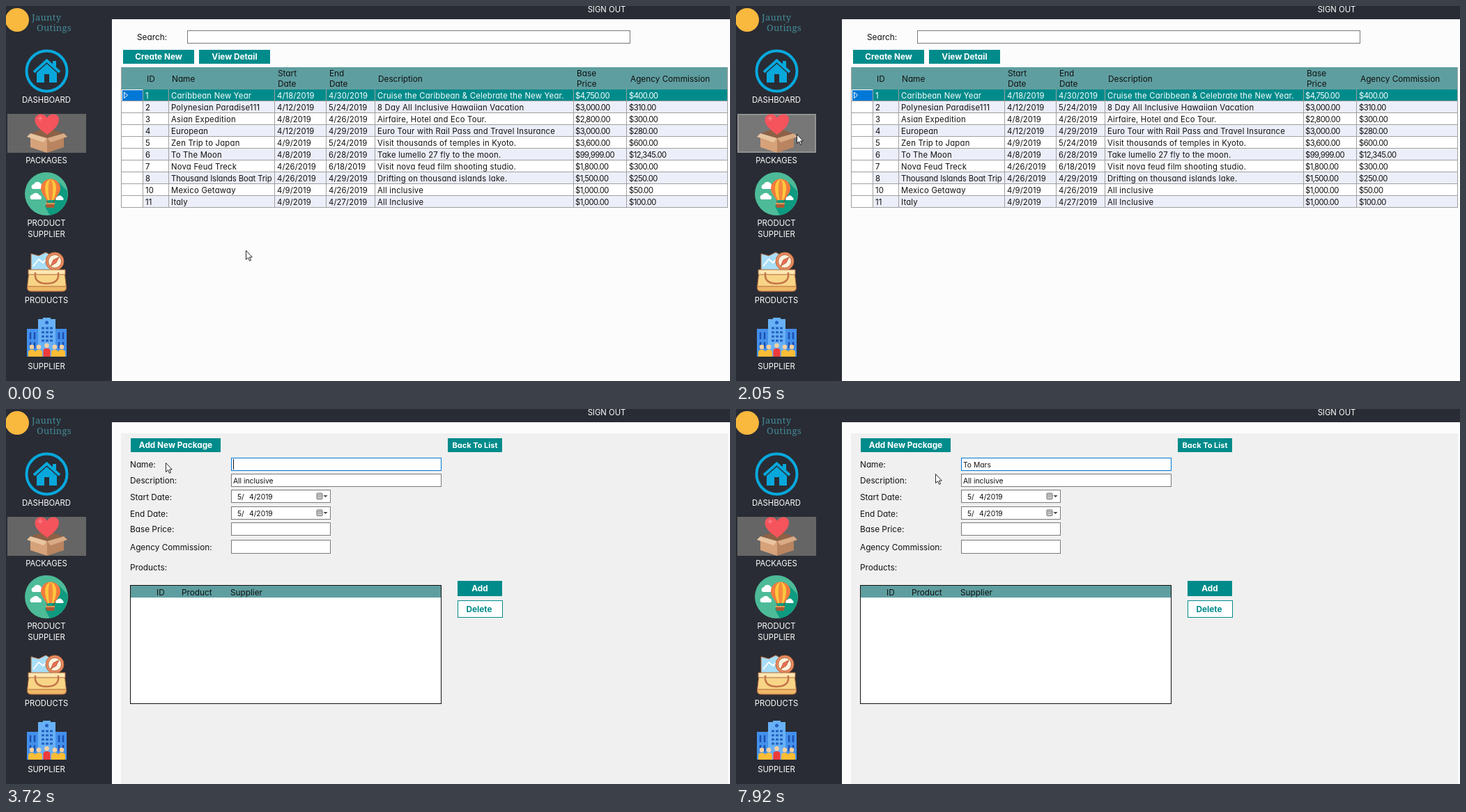
These frames come from a looping animation (1039x539 px, 8000 ms). An HTML page:

```html
<!DOCTYPE html>
<html lang="en">
<head>
<meta charset="utf-8">
<title>Travel packages</title>
<style>
html, body { margin: 0; width: 100%; height: 100%; overflow: hidden; background: #fcfcfc; }
svg { display: block; width: 1039px; height: 539px; }
text { font: 11.8px Inter, "Open Sans", sans-serif; font-feature-settings: "cv11"; white-space: pre; }
.menu { font-size: 11.3px; fill: #fff; text-anchor: middle; }
.btn { font-weight: 700; fill: #fff; text-anchor: middle; }
.cell { font-size: 11.3px; letter-spacing: .22px; }
.date { font-size: 11.3px; letter-spacing: .1px; }
.money { font-size: 11.3px; letter-spacing: -.6px; }
.tight { font-size: 11.3px; letter-spacing: -.1px; }
.field { font-size: 10.3px; }
.logo { font: 13px "Noto Serif", serif; letter-spacing: .3px; fill: #438a98; }
.crisp { shape-rendering: crispEdges; }
</style>
</head>
<body>
<svg viewBox="0 0 1039 539">
  <rect width="1039" height="539" fill="#fcfcfc"/>
  <path d="M0 0H1039V19H152V539H0Z" fill="#292c34"/>
  <text x="862" y="9" class="menu">SIGN OUT</text>

  <circle cx="16" cy="20" r="17" fill="#f9b83e"/>
  <text x="37" y="21" class="logo">Jaunty</text>
  <text x="44" y="36" class="logo">Outings</text>

  <!-- dashboard -->
  <g fill="#08a8dc">
    <circle cx="58.5" cy="93.5" r="29" fill="none" stroke="#08a8dc" stroke-width="4"/>
    <path d="M40 95L58.5 78.500L77 95" fill="none" stroke="#08a8dc" stroke-width="4"/>
    <path d="M67 79H72V90L67 85ZM44 96L58.500 83L73 96V110H44Z"/>
    <path d="M55 98H62V110H55Z" fill="#292c34"/>
  </g>
  <text x="58" y="139" class="menu">DASHBOARD</text>

  <!-- packages -->
  <rect id="tile" x="2" y="155" width="113" height="56"/>
  <rect id="focus" x="3" y="156" width="111" height="54" fill="none" stroke="#929292" stroke-width="2"/>
  <path d="M36 183L58 175L82 183L59 192Z" fill="#8c6146"/>
  <path d="M59 185C48 177 41 171 41.500 163C42 154 55 153 59 161C63 153 76 154 76 163C76 171 69 178 59 185Z" fill="#f5545c"/>
  <path d="M49 158V165M45.500 161.500H52.500" stroke="#fa8187" stroke-width="1.5"/>
  <path d="M35 184L59 191V211L35 203Z" fill="#d6a27a"/>
  <path d="M83 184L59 191V211L83 203Z" fill="#b98460"/>
  <path d="M35 183L59 190L54 196L30 188Z" fill="#e9c4a0"/>
  <path d="M83 183L59 190L64 196L88 188Z" fill="#d9ab84"/>
  <text x="58" y="226" class="menu">PACKAGES</text>

  <!-- product supplier -->
  <circle cx="58" cy="270" r="31" fill="#4dbb98"/>
  <path d="M75 253L88 266A31 31 0 0 1 63 301L56 288Z" fill="#0e9b80"/>
  <g fill="#fff">
    <path d="M38 263A4 4 0 0 1 40 256A6 6 0 0 1 51 257A3.500 3.500 0 0 1 52 263Z"/>
    <path d="M36 278A4 4 0 0 1 38 271A6 6 0 0 1 48 272A3.500 3.500 0 0 1 50 278Z"/>
    <path d="M72 279A3 3 0 0 1 74 274A4 4 0 0 1 81 275A2.500 2.500 0 0 1 82 279Z"/>
  </g>
  <path d="M58 277L60 285M70 277L68 285" stroke="#7b4a2a"/>
  <path d="M50 262A14 13.500 0 0 1 78 262C78 269 72 274 70 279H58C56 274 50 269 50 262Z" fill="#f47b3c"/>
  <path d="M64 248.500C52 253 56 270 60 279H68C72 270 76 253 64 248.500Z" fill="#fdc83e"/>
  <path d="M64 248.500C59 255 61 270 62 279H66C67 270 69 255 64 248.500Z" fill="#f58b3c"/>
  <path d="M57 283H70L69 290H58Z" fill="#a85b34"/>
  <path d="M57 284H70" stroke="#e09a56" stroke-width="2"/>
  <text x="58" y="316" class="menu">PRODUCT</text>
  <text x="58" y="331.5" class="menu">SUPPLIER</text>

  <!-- products -->
  <g stroke="#b0683f" stroke-linejoin="round">
    <path d="M36 356L47 359L57 354L66 359V384H36Z" fill="#a9def7"/>
    <path d="M39 374L47 364L53 369L62 360" fill="none" stroke="#fff" stroke-width="2"/>
    <circle cx="70" cy="367" r="13" fill="#ee8c62"/>
    <circle cx="70" cy="367" r="9.500" fill="#fff1dc"/>
    <path d="M76 361L72 369L64 374L68 365Z" fill="#ef6b55"/>
    <path d="M33 382H84L86.500 404Q87 410 81 410H36Q30 410 30.500 404Z" fill="#f8d586"/>
    <path d="M30.500 403H86.500Q87 410 81 410H36Q30 410 30.500 403Z" fill="#efb968"/>
    <path d="M32 379H85V386H32Z" fill="#fde6b0"/>
    <path d="M42 383V389Q44 399 58 399Q73 399 75 389V383" fill="none" stroke="#c4744a" stroke-width="2.500"/>
  </g>
  <text x="58" y="427" class="menu">PRODUCTS</text>

  <!-- supplier -->
  <path d="M30 464H87V504H30Z" fill="#4390ec"/>
  <path d="M46 450H53V448H64V450H71V504H46Z" fill="#68b1f6"/>
  <path d="M35 469V479M41 469V479M76 469V479M82 469V479M35 483V492M41 483V492M76 483V492M82 483V492" stroke="#1d4fae" stroke-width="2.5"/>
  <path d="M51 463H67M51 469H67M51 475H67M51 481H67" stroke="#2460c0" stroke-width="3" stroke-dasharray="4 2"/>
  <circle cx="58.5" cy="455" r="2.5" fill="#2460c0"/>
  <g id="people"></g>
  <text x="58" y="522" class="menu">SUPPLIER</text>

  <g id="list"></g>
  <g id="form"></g>
  <path id="arrow" d="M.5 .5V13.500L3.500 10.700L5.500 15.300L7.500 14.400L5.500 10H9.300Z" fill="#fff" stroke="#111" stroke-width=".9"/>
</svg>
<script>
const $ = id => document.getElementById(id);
const TEAL = '#008b8b', CADET = '#5f9ea0', PAPER = '#fcfcfc';

const text = (x, y, s, cls = '', fill = '#111') =>
  `<text x="${x}" y="${y}" class="${cls}" fill="${fill}">${s}</text>`;
const rect = (x, y, w, h, fill, extra = '') =>
  `<rect class="crisp" x="${x}" y="${y}" width="${w}" height="${h}" fill="${fill}" ${extra}/>`;
const box = (x, y, w, h, stroke = '#7a7a7a') =>
  rect(x + .5, y + .5, w - 1, h - 1, '#fff', `stroke="${stroke}"`);
const button = (x, y, w, h, label, id = '', size = 11.8) =>
  rect(x, y, w, h, TEAL, id && `id="${id}" stroke-width="2"`) +
  `<text x="${x + w / 2}" y="${y + h / 2 + 4.3}" class="btn" style="font-size:${size}px">${label}</text>`;

function person(x, y, color) {
  return `<circle cx="${x}" cy="${y}" r="3.3" fill="#fbd0a0"/>
    <path d="M${x - 5} 504V${y + 8}Q${x - 5} ${y + 4} ${x} ${y + 4}Q${x + 5} ${y + 4} ${x + 5} ${y + 8}V504Z" fill="${color}"/>`;
}
$('people').innerHTML =
  [37, 47, 70, 80].map(x => person(x, 490, '#fdbd35')).join('') + person(58.5, 488, '#ee3b3b');

const rows = [
  '1|Caribbean New Year|4/18/2019|4/30/2019|Cruise the Caribbean &amp; Celebrate the New Year.|$4,750.00|$400.00',
  '2|Polynesian Paradise111|4/12/2019|5/24/2019|8 Day All Inclusive Hawaiian Vacation|$3,000.00|$310.00',
  '3|Asian Expedition|4/8/2019|4/26/2019|Airfaire, Hotel and Eco Tour.|$2,800.00|$300.00',
  '4|European|4/12/2019|4/29/2019|Euro Tour with Rail Pass and Travel Insurance|$3,000.00|$280.00',
  '5|Zen Trip to Japan|4/9/2019|5/24/2019|Visit thousands of temples in Kyoto.|$3,600.00|$600.00',
  '6|To The Moon|4/8/2019|6/28/2019|Take lumello 27 fly to the moon.|$99,999.00|$12,345.00',
  '7|Nova Feud Treck|4/26/2019|6/18/2019|Visit nova feud film shooting studio.|$1,800.00|$300.00',
  '8|Thousand Islands Boat Trip|4/26/2019|4/29/2019|Drifting on thousand islands lake.|$1,500.00|$250.00',
  '10|Mexico Getaway|4/9/2019|4/26/2019|All inclusive|$1,000.00|$50.00',
  '11|Italy|4/9/2019|4/27/2019|All Inclusive|$1,000.00|$100.00'
];
const cellX = [200, 237, 389, 463, 533, 817, 894];
const cellClass = ['date', 'cell', 'date', 'date', 'cell', 'money', 'money'];

function table() {
  let out = rect(165, 88, 871, 32, CADET);
  rows.forEach((row, i) => {
    const y = 120 + 17 * i;
    out += rect(165, y, 871, 17, i ? (i % 2 ? '#eceef9' : '#fff') : TEAL);
    out += rect(165, y, 31, 17, '#fff');
    if (!i) out += rect(167, y + 1, 29, 15, '#0078d7');
    row.split('|').forEach((s, c) => {
      const cls = s.length > 24 && c === 1 ? 'tight' : cellClass[c];
      out += text(cellX[c], y + 13.3, s, cls, i ? '#111' : '#fff');
    });
  });
  let lines = 'M165.5 88V290M1035.5 88V290';
  for (const x of [196, 233, 385, 459, 529, 814, 890]) lines += `M${x}.5 120V290`;
  for (let y = 137; y <= 290; y += 17) lines += `M165 ${y - .5}H1036`;
  out += `<path class="crisp" d="${lines}" stroke="#a0a0a0" fill="none"/>`;
  out += '<path d="M169.500 124V132.500L174.500 128.200Z" fill="none" stroke="#fff"/>';
  const heads = [[202, 'ID'], [238, 'Name'], [390, 'Start', 'Date'], [464, 'End', 'Date'],
    [534, 'Description'], [819, 'Base', 'Price'], [896, 'Agency Commission']];
  for (const [x, a, b] of heads)
    out += b ? text(x, 101, a) + text(x, 116, b) : text(x, 108.5, a);
  return out;
}

$('list').innerHTML = text(188, 49, 'Search:') + box(260, 35, 636, 19) +
  button(168, 63, 102, 20, 'Create New', 'create') + button(277, 63, 102, 20, 'View Detail') + table();

function dateField(y) {
  return box(323, y, 143, 19) + text(332, y + 13.5, '5/', 'field') + text(349, y + 13.5, '4/2019', 'field') +
    `<rect x="446" y="${y + 5}" width="8" height="8.500" rx="1" fill="#d2d2d2" stroke="#6c6c6c"/>
     <path d="M447 ${y + 7.5}H453M447 ${y + 10}H453" stroke="#8d8d8d"/>
     <path d="M455.500 ${y + 8}H461.500L458.500 ${y + 11}Z" fill="#444"/>`;
}

const labels = [[84, 'Name'], [107, 'Description'], [131, 'Start Date'], [155, 'End Date'],
  [177, 'Base Price'], [203, 'Agency Commission'], [232, 'Products']];
$('form').innerHTML = rect(165, 35, 871, 504, '#f0f0f0') +
  button(179, 42, 129, 20, 'Add New Package') + button(634, 42, 78, 20, 'Back To List', '', 11) +
  labels.map(([y, s]) => text(178, y, s + ':')).join('') +
  box(323, 70, 302, 19, '#0078d7') + box(323, 93, 302, 19) + text(326, 107, 'All inclusive', 'field') +
  dateField(116) + dateField(140) + box(323, 163, 143, 19) + box(323, 188, 143, 20) +
  box(178, 253, 447, 171, '#111') + rect(179, 254, 445, 17, CADET) +
  text(216, 267.5, 'ID') + text(252, 267.5, 'Product') + text(322, 267.5, 'Supplier') +
  button(648, 247, 64, 22, 'Add') + box(648, 275, 65, 25, TEAL) +
  `<text x="679" y="292" class="btn" style="fill:${TEAL}">Delete</text>` +
  '<text id="typed" x="326" y="83.500" class="field" fill="#111"></text>' +
  rect(326, 72, 1, 15, '#111', 'id="caret"');

// Each track lists [start ms, value]; a value holds until the next entry.
const cursor = [[0, [344, 351]], [810, [336, 342]], [940, [318, 324]], [1090, [309, 306]],
  [1240, [275, 251]], [1360, [234, 197]], [1510, [163, 177]], [1630, [96, 184]], [1780, [87, 184]],
  [2480, [140, 146]], [2600, [184, 115]], [2760, [217, 88]], [2910, [229, 77]],
  [5350, null], [7920, [286, 93]]];
const tile = [[0, '#656565'], [1630, '#777'], [2480, '#656565']];
const focus = [[0, false], [1930, true], [3590, false]];
const hover = [[0, false], [2910, true]];
const form = [[0, false], [3720, true]];
const typing = [[0, ''], [5350, 'T'], [5910, 'To'], [6060, 'To '], [6330, 'To M'],
  [6450, 'To Ma'], [6600, 'To Mar'], [7120, 'To Mars']];
const caret = [[0, true], [4340, false], [4890, true], [7650, false]];

const at = (track, t) => track.findLast(([start]) => start <= t)[1];
const show = (id, on) => $(id).setAttribute('display', on ? 'inline' : 'none');

function draw(t) {
  const pos = at(cursor, t);
  show('arrow', pos);
  if (pos) $('arrow').setAttribute('transform', `translate(${pos})`);
  $('tile').setAttribute('fill', at(tile, t));
  show('focus', at(focus, t));
  const hot = at(hover, t);
  $('create').setAttribute('fill', hot ? '#40e4e4' : TEAL);
  $('create').setAttribute('stroke', hot ? PAPER : 'none');
  const editing = at(form, t);
  show('list', !editing);
  show('form', editing);
  $('typed').textContent = at(typing, t);
  show('caret', at(caret, t));
  if (editing) $('caret').setAttribute('x', 326 + Math.round($('typed').getComputedTextLength()));
}

let start;
function tick(now) {
  start ??= now;
  draw((now - start) % 8000);
  requestAnimationFrame(tick);
}
draw(0);
requestAnimationFrame(tick);
</script>
</body>
</html>
```
